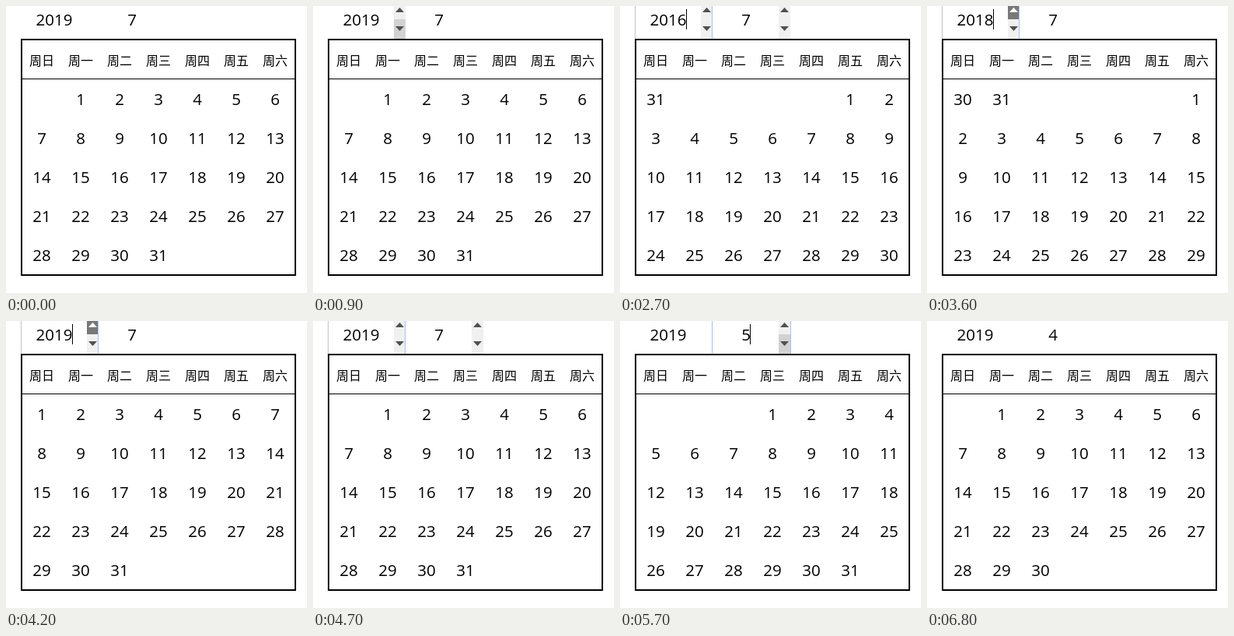
Recreate the animation shown at these times as an HTML page. Size 387 by 368 pixels, loop 6900 ms.

```html
<!DOCTYPE html>
<html lang="zh-CN">
<head>
<meta charset="utf-8">
<title>Calendar</title>
<style>
  html, body { margin: 0; width: 100%; height: 100%; overflow: hidden; background: #fff; }
  svg { display: block; }
  text { font: 20.5px "Open Sans", "Noto Sans", sans-serif; text-anchor: middle; fill: #000; }
  .head text { font: 16px "Noto Sans CJK SC", "Noto Sans CJK", sans-serif; }
  .button { fill: #f0f0f0; }
  .arrow { fill: #505050; }
  .spin.off, .hidden { display: none; }
  .spin.up .button.top, .spin.down .button.bottom { fill: #d2d2d2; }
  .spin.upPress .button.top, .spin.downPress .button.bottom { fill: #787878; }
  .spin.upPress .arrow.top, .spin.downPress .arrow.bottom { fill: #fff; }
</style>
</head>
<body>
<svg width="387" height="368" viewBox="0 0 387 368">
  <g id="fields"></g>
  <rect x="20" y="43" width="352" height="302" fill="none" stroke="#000" stroke-width="2"/>
  <rect x="21" y="93" width="350" height="1"/>
  <g id="head" class="head"></g>
  <g id="days"></g>
</svg>
<script>
const LOOP = 6900;
const byId = id => document.getElementById(id);

function add(parent, tag, attrs, content = '') {
  const el = document.createElementNS('http://www.w3.org/2000/svg', tag);
  for (const key in attrs) el.setAttribute(key, attrs[key]);
  el.textContent = content;
  return parent.appendChild(el);
}

// A number input whose spinner starts 85px after its left edge.
function makeField(x, caretX, edges) {
  const root = add(byId('fields'), 'g', {});
  const spin = add(root, 'g', {});
  const sx = x + 85;
  add(spin, 'rect', { class: 'button top', x: sx, y: 0, width: 15, height: 17 });
  add(spin, 'rect', { class: 'button bottom', x: sx, y: 17, width: 15, height: 25 });
  add(spin, 'path', { class: 'arrow top', d: `M${sx + 2} 8h11l-5.5-6z` });
  add(spin, 'path', { class: 'arrow bottom', d: `M${sx + 2} 26h11l-5.5 6z` });
  const focus = add(root, 'g', {});
  for (const [ex, fill] of edges) add(focus, 'rect', { x: ex, y: 0, width: 1, height: 42, fill });
  const text = add(root, 'text', { x: x + 43, y: 25 });
  const caret = add(root, 'rect', { x: caretX, y: 4, width: 1, height: 26 });
  return (value, spinState, focused, caretOn) => {
    text.textContent = value;
    spin.setAttribute('class', 'spin ' + spinState);
    focus.setAttribute('class', focused ? '' : 'hidden');
    caret.setAttribute('class', focused && caretOn ? '' : 'hidden');
  };
}

const drawYear = makeField(19, 85, [[19, '#c3c3c3'], [118, '#a8bff0']]);
const drawMonth = makeField(119, 167, [[118, '#a8bff0'], [219, '#a8bff0']]);

[...'日一二三四五六'].forEach((name, i) =>
  add(byId('head'), 'text', { x: 46 + 50 * i, y: 76 }, '周' + name));

const cells = Array.from({ length: 35 }, (_, i) =>
  add(byId('days'), 'text', { x: 46 + 50 * (i % 7), y: 127 + 50 * Math.floor(i / 7) }));

// Days past the fifth row wrap back to the first.
function drawDays([year, month]) {
  const start = new Date(year, month - 1, 1).getDay();
  const count = new Date(year, month, 0).getDate();
  cells.forEach(cell => cell.textContent = '');
  for (let d = 1; d <= count; d++) cells[(start + d - 1) % 35].textContent = d;
}

// Each step changes part of the state; the days follow the fields a moment later.
const steps = [
  [0, { year: 2019, month: 7, shown: [2019, 7], ySpin: 'off', mSpin: 'off', focus: '', caret: false }],
  [200, { mSpin: 'idle' }],
  [300, { ySpin: 'down', mSpin: 'off' }],
  [400, { ySpin: 'idle' }],
  [600, { ySpin: 'off', mSpin: 'idle' }],
  [900, { ySpin: 'down', mSpin: 'off' }],
  [1100, { year: 2018, ySpin: 'downPress', focus: 'year', caret: true }],
  [1300, { shown: [2018, 7], ySpin: 'down' }],
  [1600, { caret: false }],
  [1900, { year: 2017, ySpin: 'downPress', caret: true }],
  [2000, { shown: [2017, 7], ySpin: 'down' }],
  [2400, { year: 2016, ySpin: 'downPress' }],
  [2500, { shown: [2016, 7], ySpin: 'down' }],
  [2700, { ySpin: 'idle', mSpin: 'idle' }],
  [2800, { ySpin: 'up', mSpin: 'off' }],
  [2900, { caret: false }],
  [3000, { year: 2017, ySpin: 'upPress', caret: true }],
  [3100, { shown: [2017, 7], ySpin: 'up' }],
  [3500, { caret: false }],
  [3600, { year: 2018, ySpin: 'upPress', caret: true }],
  [3700, { shown: [2018, 7], ySpin: 'up' }],
  [4100, { caret: false }],
  [4200, { year: 2019, ySpin: 'upPress', caret: true }],
  [4300, { shown: [2019, 7], ySpin: 'up' }],
  [4400, { ySpin: 'idle', mSpin: 'idle' }],
  [4700, { caret: false }],
  [4800, { mSpin: 'down' }],
  [5100, { month: 6, ySpin: 'off', mSpin: 'downPress', focus: 'month', caret: true }],
  [5200, { shown: [2019, 6], mSpin: 'down' }],
  [5600, { month: 5, mSpin: 'downPress' }],
  [5700, { shown: [2019, 5], mSpin: 'down' }],
  [6100, { month: 4, mSpin: 'downPress' }],
  [6200, { shown: [2019, 4], mSpin: 'down' }],
  [6300, { mSpin: 'idle' }],
  [6600, { caret: false }],
  [6800, { mSpin: 'off', focus: '' }]
];

let current = -1;
function render(now) {
  const t = now % LOOP;
  const index = steps.filter(([at]) => at <= t).length - 1;
  if (index === current) return;
  current = index;
  const s = Object.assign({}, ...steps.slice(0, index + 1).map(step => step[1]));
  drawYear(s.year, s.ySpin, s.focus === 'year', s.caret);
  drawMonth(s.month, s.mSpin, s.focus === 'month', s.caret);
  drawDays(s.shown);
}

const begin = performance.now();
function tick() {
  render(performance.now() - begin);
  requestAnimationFrame(tick);
}
tick();
</script>
</body>
</html>
```
